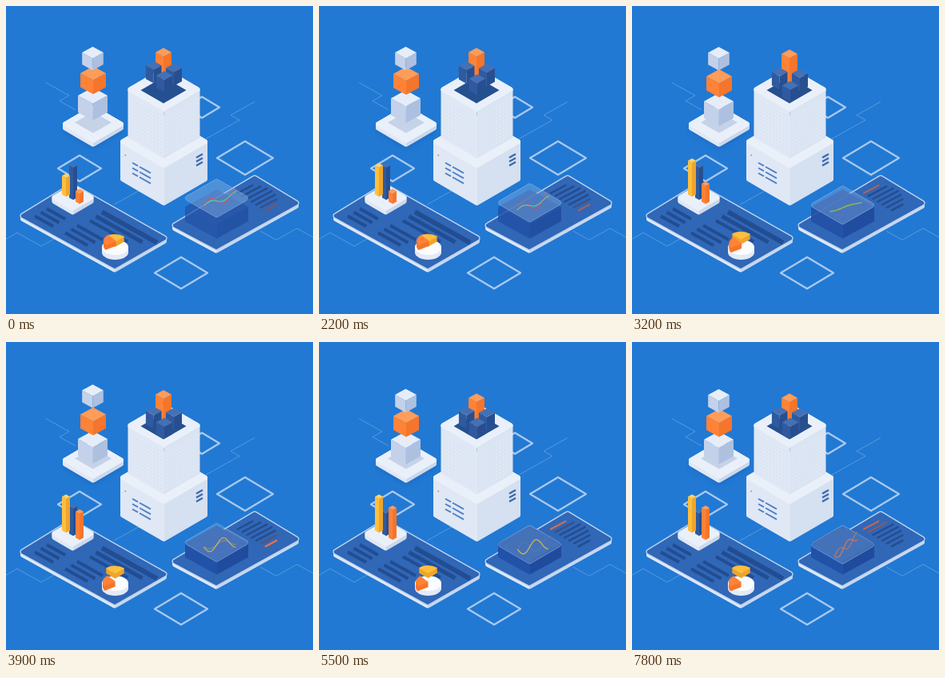
An HTML page with a canvas that plays this animation: 384x386 px, repeating every 8 s.

```html
<!DOCTYPE html>
<html lang="en">
<head>
<meta charset="utf-8">
<title>Isometric data centre</title>
<style>
html, body { margin: 0; width: 100%; height: 100%; overflow: hidden; background: #2179d3; }
canvas { display: block; width: 384px; height: 386px; }
</style>
</head>
<body>
<canvas></canvas>
<script>
const LOOP = 8000;
const SLOPE = 0.56;
const canvas = document.querySelector('canvas');
const ratio = window.devicePixelRatio || 1;
canvas.width = 384 * ratio;
canvas.height = 386 * ratio;
const ctx = canvas.getContext('2d');
ctx.scale(ratio, ratio);
ctx.lineJoin = 'round';

// Face colours: top, left, right
const WHITE = ['#eaf0fa', '#e0e8f5', '#cbd8ec'];
const PALE = ['#e6edf9', '#c3d1ea', '#adc0e0'];
const ORANGE = ['#ff9c59', '#ff8237', '#f5752b'];
const YELLOW = ['#ffd264', '#ffbe3d', '#efa52b'];
const NAVY = ['#4471b6', '#2f5a9f', '#274f90'];
const WALL = ['#eaf0fa', '#e0e8f5', '#d5e0f0'];
const TABLET = ['#3067b6', '#dfe8f6', '#c9d8ee'];

// Eased value going from a to b between the times t0 and t1 (seconds)
function ease(t, t0, t1, a, b) {
  const k = Math.min(1, Math.max(0, (t - t0) / (t1 - t0)));
  return a + (b - a) * (1 - Math.cos(Math.PI * k)) / 2;
}

function trace(pts, closed) {
  ctx.beginPath();
  pts.forEach(([x, y]) => ctx.lineTo(x, y));
  if (closed) ctx.closePath();
}

function poly(pts, fill) {
  trace(pts, true);
  ctx.fillStyle = fill;
  ctx.fill();
}

function line(pts, color, width, closed) {
  trace(pts, closed);
  ctx.strokeStyle = color;
  ctx.lineWidth = width;
  ctx.stroke();
}

const diamond = (x, y, w, h = w * 0.58) => [[x - w, y], [x, y - h], [x + w, y], [x, y + h]];

// Straight bar starting at (x, y) with horizontal reach dx
const bar = (x, y, dx, color, width, slope = SLOPE) =>
  line([[x, y], [x + dx, y + dx * slope]], color, width);

// Thin line whose slope flips at every step
function wire(x, y, sign, ...steps) {
  const pts = [[x, y]];
  for (const dx of steps) {
    pts.push([x += dx, y += dx * SLOPE * sign]);
    sign = -sign;
  }
  line(pts, '#64a2e3', 0.8);
}

// Upright block; (x, y) is the back corner of its top face
function block(x, y, w, depth, [top, left, right]) {
  const h = w * 0.55, m = y + h, b = m + h;
  poly([[x - w, m], [x, b], [x, b + depth], [x - w, m + depth]], left);
  poly([[x + w, m], [x, b], [x, b + depth], [x + w, m + depth]], right);
  poly(diamond(x, m, w, h), top);
}

function roundPath(pts, r, dy) {
  const last = pts[pts.length - 1];
  ctx.beginPath();
  ctx.moveTo((last[0] + pts[0][0]) / 2, (last[1] + pts[0][1]) / 2 + dy);
  pts.forEach(([x, y], i) => {
    const [nx, ny] = pts[(i + 1) % pts.length];
    ctx.arcTo(x, y + dy, nx, ny + dy, r);
  });
  ctx.closePath();
}

// Rounded plate; corners in the order left, top, right, bottom
function slab(pts, depth, [top, left, right], rim) {
  const side = ctx.createLinearGradient(pts[0][0], 0, pts[2][0], 0);
  const k = (pts[3][0] - pts[0][0]) / (pts[2][0] - pts[0][0]);
  side.addColorStop(k, left);
  side.addColorStop(k, right);
  ctx.fillStyle = side;
  for (let d = depth; d >= 0; d--) {
    roundPath(pts, 3, d);
    ctx.fill();
  }
  roundPath(pts, 3, 0);
  ctx.fillStyle = top;
  ctx.fill();
  if (rim) {
    ctx.strokeStyle = rim;
    ctx.lineWidth = 1.4;
    ctx.stroke();
  }
}

function backdrop() {
  ctx.fillStyle = '#2179d3';
  ctx.fillRect(0, 0, 384, 386);
  wire(50, 96, 1, 29, -12, 20);
  wire(311, 120, -1, -30, 11, -42);
  wire(0, 292, -1, 14, 30, 20);
  wire(318, 282, 1, 20, 26, 20);
  wire(135, 249, -1, 39);
  const outline = (x, y, w) => line(diamond(x, y, w, w * 0.6), '#a9c9ef', 2.3, true);
  outline(245, 127, 22);
  outline(299, 190.5, 35);
  outline(92, 203.5, 27);
  outline(219, 334.5, 33);
}

function pedestal(t) {
  ctx.save();
  ctx.filter = 'blur(3px)';
  poly(diamond(109, 156, 39), 'rgba(20,80,165,.35)');
  ctx.restore();
  slab(diamond(109, 148, 41), 5, WHITE);
  poly(diamond(109, 146, 23), '#c5d2e8');
  block(108.5, ease(t, 0.6, 4.6, 102, 112), 18.5, 21, PALE);
  block(109, ease(t, 1.6, 5, 75.5, 84), 16, 17.5, ORANGE);
  block(108.5, ease(t, 2.9, 5.8, 51, 59), 13.3, 15, PALE);
}

function tower(t) {
  slab(diamond(197.5, 170, 57.5), 47, WALL);
  poly([[152.5, 104], [197.5, 130], [197.5, 191], [152.5, 165]], '#e0e8f5');
  poly([[242.5, 104], [197.5, 130], [197.5, 191], [242.5, 165]], '#dae4f2');

  // Perforated walls
  for (let dx = 3; dx < 43; dx += 4.2) {
    for (let y = 115; y < 163; y += 4.5) {
      ctx.fillStyle = '#d0dcee';
      ctx.fillRect(152.5 + dx, y + dx * SLOPE, 1.2, 1.2);
      ctx.fillStyle = '#e8eef8';
      ctx.fillRect(241.5 - dx, y + dx * SLOPE, 1.2, 1.2);
    }
  }
  slab(diamond(197.5, 104.5, 48), 1, WALL);
  poly(diamond(197, 105.5, 28.5), '#25508f');

  // Columns sink into the shaft
  ctx.save();
  trace([[168, 0], [168, 105.5], [197, 122], [226, 105.5], [226, 0]], true);
  ctx.clip();
  block(197, ease(t, 2.6, 4.8, 52.5, 64.5), 10, 34, ORANGE);
  block(184.7, ease(t, 1.9, 4, 69, 81), 9.8, 17, NAVY);
  block(210, ease(t, 1.9, 4.2, 72, 83), 10, 17, NAVY);
  block(198, ease(t, 1.4, 3.6, 81.5, 95), 10.3, 15, NAVY);
  ctx.restore();

  for (let i = 0; i < 3; i++) {
    bar(158, 196.5 + i * 6.5, 7, '#4f80c6', 2);
    bar(167, 201.5 + i * 6.5, 14, '#4f80c6', 2);
    bar(238, 190 + i * 5, 8, '#3c68ae', 2.2, -SLOPE);
  }
  ctx.fillStyle = '#f58a50';
  ctx.fillRect(148.5, 186, 1.6, 2);
}

function wedge(x, y, from, to, color) {
  for (let d = 6; d >= 0; d--) {
    ctx.beginPath();
    ctx.moveTo(x, y + d);
    ctx.ellipse(x, y + d, 16, 10, 0, from * Math.PI, to * Math.PI);
    ctx.fillStyle = color[d ? 2 : 1];
    ctx.fill();
  }
}

function pie(t) {
  for (let d = 6; d >= 0; d--) {
    ctx.beginPath();
    ctx.ellipse(136.5, 302.5 + d, 16.5, 9.5, 0, 0, 2 * Math.PI);
    ctx.fillStyle = d ? '#e3eaf6' : '#fbfcff';
    ctx.fill();
  }
  wedge(136.5, ease(t, 1.9, 4.4, 296, 290), 1.24, 1.76, YELLOW);
  wedge(ease(t, 2, 4.4, 138, 137), ease(t, 2, 4.4, 294.5, 301), 0.82, 1.28, ORANGE);
}

function leftTablet(t) {
  slab([[15, 263], [82, 222], [204, 291], [136, 330]], 4, TABLET, '#bdd2f0');
  const ink = '#224d93';
  for (let i = 0; i < 3; i++) {
    bar(51 - i * 7.5, 254 + i * 4.6, 23, ink, 4);
    bar(89 - i * 7.5, 275 + i * 4.6, 32 - i * 2, ink, 4);
    bar(120 - i * 7.5, 258 + i * 5.5, 69 - i * 11, ink, 6 - i);
  }
  slab(diamond(83.5, 240, 29), 5, WHITE);
  const column = (x, y, foot, colors) => block(x, y, 5, foot - y - 5.6, colors);
  column(84, ease(t, 3, 4.8, 197, 209), 243, NAVY);
  column(75, ease(t, 0.6, 3.2, 210, 191), 239, YELLOW);
  column(92, ease(t, 2.2, 4.6, 229, 205), 248, ORANGE);
  pie(t);
}

function textLines(t) {
  // A highlight sweeps over the lines, rests on the last one and fades
  const period = 2.25, phase = (t + 1.7) % period;
  const head = ease(phase, 0.3, 1.1, -0.7, 6);
  const glow = ease(phase, 1.5, 1.85, 1, 0);
  for (let i = 0; i < 7; i++) {
    const x = 289 + i * 5.8, y = 235 + i * 3.6, len = 27 - (i - 2.6) ** 2;
    bar(x, y, len, '#254c90', 2.4, -0.53);
    ctx.globalAlpha = glow * Math.max(0, 1 - Math.abs(head - i) / 1.3);
    bar(x, y, len, '#e2754e', 2.4, -0.53);
    ctx.globalAlpha = 1;
  }
}

function chart(t, cy) {
  const span = ease(t, 4.7, 7.8, 40, 28);
  const slope = ease(t, 2.5, 4.5, -15, -5) + ease(t, 4.8, 7.6, 0, -21);
  const amp = ease(t, 2.2, 4.2, -6, 8) + ease(t, 4.8, 7, 0, -3);
  const curve = (scale, hue, alpha) => {
    const pts = [];
    for (let u = 0; u <= 1.001; u += 0.04) {
      const wave = Math.sin(2.5 * Math.PI * u) * amp * scale;
      pts.push([267.5 + span * (u - 0.5), cy + slope * (u - 0.5) + wave]);
    }
    line(pts, `hsla(${hue}, 62%, 58%, ${alpha})`, 1.2);
  };
  const toOrange = ease(t, 6.4, 7.8, 0, -29);
  curve(1, ease(t, 2.2, 4.4, -8, 47) + toOrange, 1);
  curve(ease(t, 4.5, 5, 0.5, -1), ease(t, 2.2, 4.4, 155, 47) + toOrange,
    ease(t, 3, 4.5, 0.9, 0) + ease(t, 5.2, 6.6, 0, 0.75));
}

function rightTablet(t) {
  slab([[205, 275], [311, 212], [369, 247], [263, 306]], 4, TABLET, '#bdd2f0');
  textLines(t);
  const cy = ease(t, -1.5, 6, 239.5, 254);
  ctx.globalAlpha = ease(t, 0, 5, 0.72, 1);
  block(263.5, 230, 39.5, 18, ['#2452a6', '#2251a8', '#1f4b9e']);
  ctx.globalAlpha = 1;
  roundPath(diamond(263.5, cy, 42), 3, 0);
  ctx.fillStyle = `rgba(125,168,220,${ease(t, 0, 5.5, 0.5, 0.36)})`;
  ctx.fill();
  ctx.strokeStyle = 'rgba(165,200,240,.5)';
  ctx.lineWidth = 0.9;
  ctx.stroke();
  chart(t, cy + 2);
}

function frame(now) {
  const t = (now % LOOP) / 1000;
  backdrop();
  pedestal(t);
  tower(t);
  leftTablet(t);
  rightTablet(t);
  requestAnimationFrame(frame);
}
requestAnimationFrame(frame);
</script>
</body>
</html>
```
